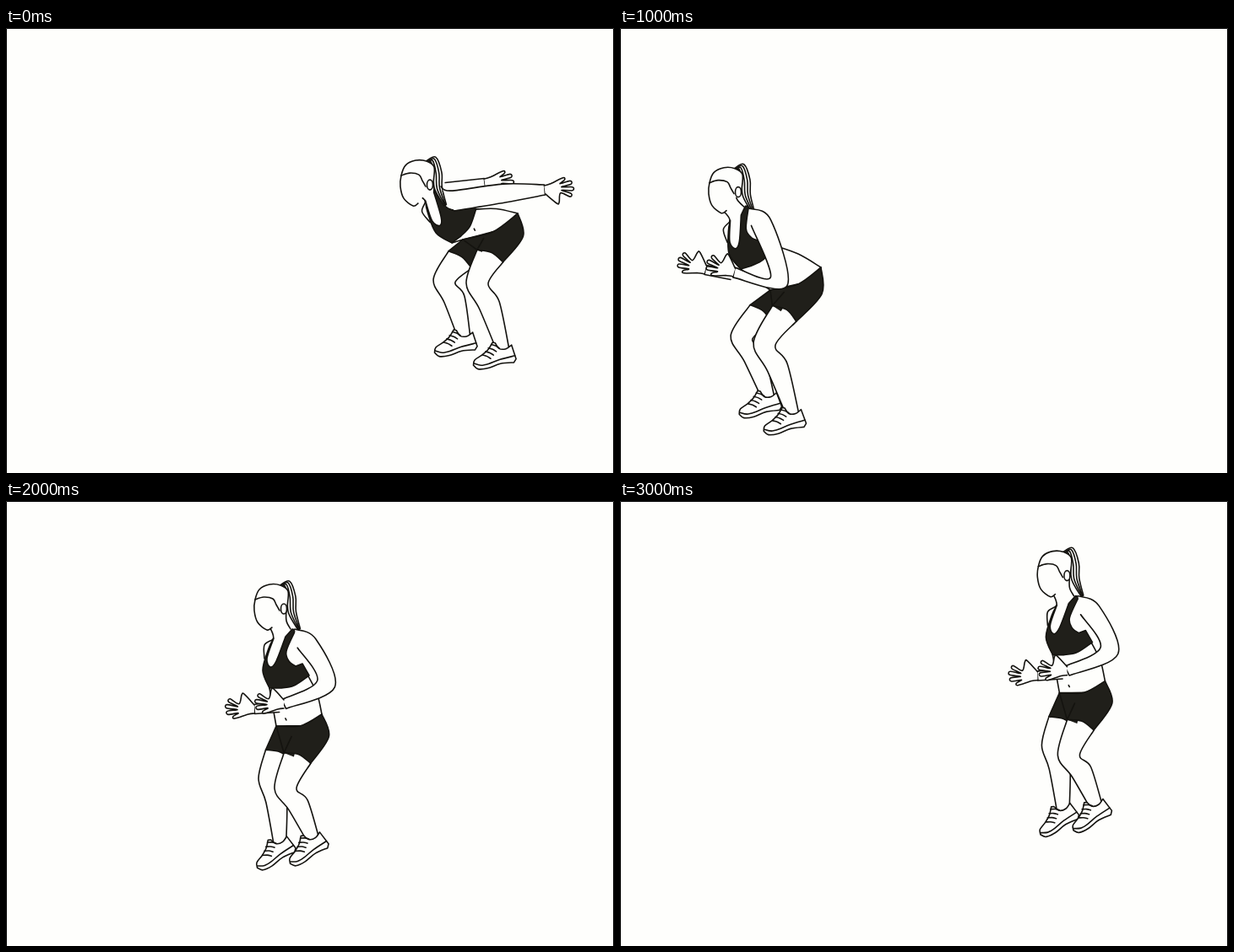
These frames come from a looping animation (720x528 px, 3330 ms). An HTML page:

```html
<!DOCTYPE html>
<html>
<head>
<meta charset="utf-8">
<style>
html, body { margin: 0; width: 100%; height: 100%; overflow: hidden; background: #fefefc; }
svg { display: block; width: 720px; height: 528px; }
path, ellipse { stroke: #14130f; stroke-width: 1.6; stroke-linecap: round; stroke-linejoin: round; }
.line { fill: none; }
.skin { fill: #fefefc; }
.cloth { fill: #201f1a; }
.frame { fill: none; stroke: #000; stroke-width: 1; }
</style>
</head>
<body>
<svg id="stage" viewBox="0 0 720 528"></svg>
<script>
const add = (a, b) => [a[0] + b[0], a[1] + b[1]];
const lerp = (a, b, k) => [a[0] + (b[0] - a[0]) * k, a[1] + (b[1] - a[1]) * k];
const polar = (r, deg) => [r * Math.cos(deg * Math.PI / 180), r * Math.sin(deg * Math.PI / 180)];
const spin = ([x, y], deg) => add(polar(x, deg), polar(y, deg + 90));
// Step sideways from p, to the left of the direction a -> b.
function aside(p, a, b, dist) {
  const [dx, dy] = [b[0] - a[0], b[1] - a[1]], len = Math.hypot(dx, dy);
  return [p[0] + dy / len * dist, p[1] - dx / len * dist];
}

// Smooth curve through the points of each run; runs meet in corners.
function curve(...runs) {
  return runs.map((p, n) => (n ? 'L' : 'M') + p[0] + p.slice(1).map((c, i) => {
    const a = p[i - 1] || p[i], b = p[i], e = p[i + 2] || c;
    const h1 = add(b, lerp([0, 0], [c[0] - a[0], c[1] - a[1]], 1 / 6));
    const h2 = add(c, lerp([0, 0], [b[0] - e[0], b[1] - e[1]], 1 / 6));
    return `C${h1} ${h2} ${c}`;
  }).join('')).join('');
}
const path = (cls, ...runs) => `<path class="${cls}" d="${curve(...runs)}"/>`;
const at = ([x, y], body, turn = 0) => `<g transform="translate(${x} ${y}) rotate(${turn})">${body}</g>`;
const points = text => text.split(' ').map(q => q.split(',').map(Number));
const shape = (cls, text) => path(cls, ...text.split(' / ').map(points));

// Both edges of a limb with a given width at each joint.
function edges(joints, widths) {
  const side = sign => joints.map((p, i) =>
    aside(p, joints[i - 1] || p, joints[i + 1] || p, sign * widths[i] / 2));
  return [side(1), side(-1).reverse()];
}
const limb = (joints, widths) => path('skin', ...edges(joints, widths));

function makeHand() {
  const outline = [[0, -5]];
  [76, 27, 8, -11, -33].forEach((a, i) => {
    const reach = i % 4 ? 24 - Math.abs(i - 2) : 18;
    if (i) outline.push(add([-9, 0], polar(11, 188 + a)));
    for (const d of [5, -5]) outline.push(add([-9, 0], polar(reach, 180 + a + d)));
  });
  return path('skin', [...outline, [-7, 6], [0, 5]]);
}
const hand = makeHand();

function makeShoe() {
  let s = shape('skin', '0,0 2,-6 11,-11 19,-17 25,-25 / 28,-24 32,-17 40,-16 47,-20 / 51,-3 / 48,1 32,1 17,5 5,5 0,0') +
    shape('line', '1,-2 9,1 18,0 32,-4 50,-7');
  for (let i = 0; i < 4; i++) {
    const x = 12 + i * 3.7, y = -11 - i * 3.9;
    s += path('line', [[x, y], [x + 5, y + 2], [x + 9, y + 5]]);
  }
  return at([-36, 16], s);
}
const shoe = makeShoe();

const bra = shape('cloth', '-12,7 -18,19 -25,45 -17,66 / -4,66 12,63 30,51 / 22,37 / 14,40 6,34 3,22 14,-3 / 10,-4 / 2,5 -9,34 -16,41 -20,31 -12,7');
const chest = shape('line', '-16,-5 -13,2 -13,8 -23,15 -23,31') + shape('line', '3,-28 3,-14 8,-4') + bra;
const face = shape('skin', '-14,-6 -20,-3 -31,-12 -35,-26 -34,-39 -29,-51 -17,-57 -4,-56 5,-49 4,-31') +
  shape('line', '-34,-39 -24,-42 -13,-40 -9,-33 -5,-26') +
  '<ellipse class="skin" cx="0" cy="-28" rx="3.5" ry="6"/>';
function head(tail) {
  const joints = points(tail), widths = [4, 8, 10, 9, 3];
  return limb(joints, widths) + limb(joints, widths.map(w => w * .35)) + face;
}
const hanging = '-4,-54 4,-58 9,-42 10,-24 18,-4', flying = '2,-55 10,-59 20,-42 31,-28 54,-18';

// The shorts end part way from the hip to the knee; the calf bulges backwards.
function leg(hip, [knee, ankle], turn) {
  const hem = lerp(hip, knee, .58);
  const joints = [hem, knee, add(lerp(knee, ankle, .35), [4, -1]), lerp(knee, ankle, 1.05)];
  const widths = [34, 26, 25, 14], [back, front] = edges(joints, widths);
  return { art: limb(joints, widths) + at(ankle, shoe, turn),
    back: back[0], front: front[3], rim: lerp(hem, hip, .09) };
}

function figure({ neck, tilt, tail = hanging, arm, farArm, palm, waist, near, far, foot }) {
  const [belly, spine] = waist, middle = lerp(belly, spine, .5);
  const farLeg = leg(lerp(belly, spine, .35), far, foot);
  const nearLeg = leg(lerp(belly, spine, .82), near, foot);
  const sag = aside(middle, belly, spine, -7);
  const seat = aside(lerp(spine, nearLeg.back, .4), spine, nearLeg.back, 14);
  const ribs = [[-17, 66], [28, 50]].map(p => add(neck, spin(p, tilt)));
  const joints = [add(neck, [27, 13]), ...arm];
  const [outer, inner] = edges(joints, [24, 22, 12]);

  return farLeg.art +
    path('cloth', [belly, sag], [farLeg.back, farLeg.rim, farLeg.front], [belly]) +
    nearLeg.art +
    path('cloth', [belly, sag, spine], [spine, seat, nearLeg.back],
      [nearLeg.back, nearLeg.rim, nearLeg.front], [belly]) +
    path('line', [nearLeg.front, lerp(nearLeg.front, middle, .5)]) +
    path('line', [ribs[0], belly]) +
    path('line', [ribs[1], aside(lerp(ribs[1], spine, .5), ribs[1], spine, 3), spine]) +
    at(add(lerp(belly, spine, .22), [-1, -6]), path('line', [[0, 0], [1, 2]])) +
    limb(farArm, [13, 11]) + at(farArm[1], hand, palm) +
    at(neck, chest, tilt) +
    at(add(neck, [0, tilt * tilt / 62]), head(tail)) +
    path('skin', [add(neck, [13, -4]), ...outer], inner) +
    at(arm[1], hand, palm);
}

const crouch = {
  neck: [502, 192], tilt: -37, palm: 172, foot: -5,
  arm: [[590, 196], [638, 192]], farArm: [[521, 190], [567, 184]],
  waist: [[541, 251], [606, 220]],
  near: [[558, 303], [588, 381]], far: [[519, 300], [542, 366]]
};
const flight = {
  neck: [340, 92], tilt: -8, palm: 5, foot: -32, tail: flying,
  arm: [[391, 155], [336, 159]], farArm: [[324, 163], [279, 165]],
  waist: [[355, 206], [407, 188]],
  near: [[381, 288], [406, 377]], far: [[343, 289], [345, 368]]
};
const landing = {
  neck: [140, 218], tilt: -17, palm: 17, foot: -7,
  arm: [[188, 301], [135, 290]], farArm: [[132, 292], [101, 287]],
  waist: [[178, 311], [238, 284]],
  near: [[171, 375], [204, 458]], far: [[144, 367], [175, 438]]
};
const shuffle = {
  neck: [384, 146], tilt: 0, palm: 0, foot: -24,
  arm: [[434, 207], [384, 231]], farArm: [[378, 234], [349, 237]],
  waist: [[375, 257], [429, 243]],
  near: [[386, 331], [418, 391]], far: [[367, 320], [379, 396]]
};
const crossing = { ...shuffle, near: [[376, 332], [384, 414]], far: [[356, 329], [398, 396]] };

// Pose and shift for each beat.
const beats = [
  [crouch, 0, 0], [flight, 88, -10], [flight, 0, 0], [landing, 0, 0],
  [shuffle, -185.5, 35], [crossing, -109.5, 20], [shuffle, -55, 10],
  ...[0, 1, 2].map(i => [shuffle, i * 72.7, i * -14.7])
];
const stage = document.getElementById('stage');
stage.innerHTML = beats.map(([pose, x, y]) => `<g class="pose">${at([x, y], figure(pose))}</g>`).join('') +
  '<path class="frame" d="M.5 528V.5H719.5V528"/>';
const groups = stage.querySelectorAll('.pose');

function show() {
  // Beats start at multiples of a third of a second, rounded to 10 ms.
  const t = performance.now() % 3330;
  const now = groups.length - 1 - [...groups].reverse().findIndex((g, i) =>
    Math.round((groups.length - 1 - i) * 100 / 3) * 10 <= t + (i === groups.length - 2 ? 0 : 0));
  groups.forEach((g, i) => g.style.display = i === now ? '' : 'none');
  requestAnimationFrame(show);
}
show();
</script>
</body>
</html>
```
